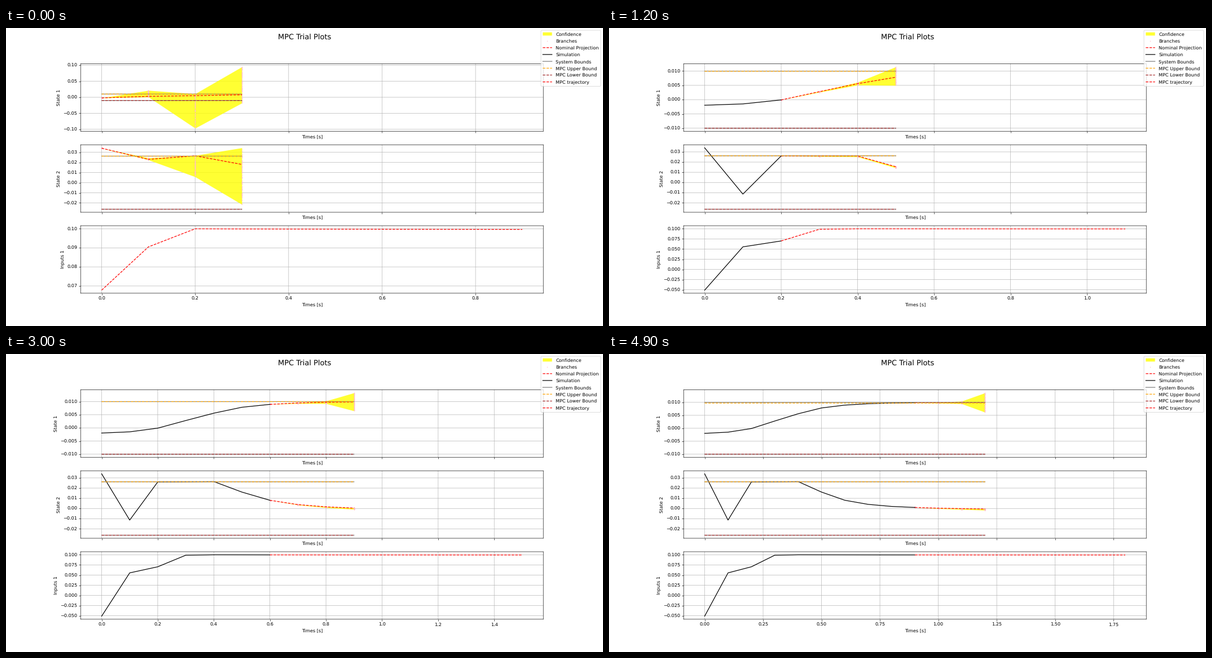
Write a matplotlib script that moves like this. It is 1058 by 529 pixels and loops after 5000 ms.

```python
import numpy as np
import matplotlib.pyplot as plt
from matplotlib.animation import FuncAnimation

plt.rcParams.update({"font.family": "DejaVu Sans", "text.hinting": "none",
                     "path.snap": False})

DT, STEPS, ITERS, HORIZON, AHEAD = 0.1, 10, 5, 10, 4
BOUNDS = (0.01, np.deg2rad(1.5))
AHEAD_IDX = np.arange(AHEAD)
SAMPLES = 80


def settle(start, goal, ratio, n):
    """Follow the start values, then decay geometrically to the goal."""
    tail = np.arange(1, n - len(start) + 1)
    return np.r_[start, goal + (start[-1] - goal) * ratio ** tail]


# Closed-loop run: both states and the input.
X = np.array([
    settle([-.00196, -.0015, -.0001, .0028, .0056], .01, .49, 13),
    settle([.034, -.0114, .026, .0262, .0264, .0161], 0, .5, 13),
])
U = settle([-.051, .0555, .0705, .099, .1], .0995, .85, 20)

# First step: the plan moves from a guess, over a cautious one, to the run.
SLOPE = 1 - (1 - AHEAD_IDX / 3) ** 1.4
FIRST_X = np.array([
    [[-.00196, .003, .005, .0076], [.034, .023, .0265, .018]],
    [-.00196 + .005 * SLOPE, .034 - .036 * SLOPE],
    X[:, :AHEAD],
])
FIRST_U = np.array([
    settle([.0678, .0905, .1], .0995, .85, HORIZON),
    np.interp(np.arange(HORIZON), [0, 1, 2, 3, 6, 7, 8, 9],
              [.0555, .03, .0258, .0315, .0304, .028, .0338, .05]),
    U[:HORIZON],
])
# Untrained model: reach of the tube as (below, above) for each state.
FIRST_TUBE = np.array([
    [[0, .002, .1015, .0255], [0, .0185, .006, .0875]],
    [[0, .0005, .0207, .0395], [0, .0015, .0004, .0164]],
])


def blend(plans, it):
    i = min(it // 2, 1)
    w = it / 2 - i
    return plans[i] * (1 - w) + plans[i + 1] * w


def tube_reach(frame):
    if frame < ITERS:
        return FIRST_TUBE
    keys = (5, 19, 25, 49)
    below = np.interp(frame, keys, (.0039, .0018, .0033, .0038))
    above = np.interp(frame, keys, (.0029, .0044, .0034, .0037))
    return np.array([
        [[0, .0002, .0005, below], [0, .0001, .0005, above]],
        [.0004 * AHEAD_IDX, .0001 * AHEAD_IDX],
    ])


def plan(frame):
    k, it = divmod(frame, ITERS)
    if k == 0:
        return blend(FIRST_X, it), blend(FIRST_U, it)
    # The input error fades within a step and from step to step.
    error = .0077 / k ** 3 * (1 - it / (ITERS - 1)) * .4 ** np.arange(HORIZON)
    states = X[:, k:k + AHEAD].copy()
    states[1] -= .0002 * AHEAD_IDX
    states[1, 1:] -= .25 * error[:AHEAD - 1]
    return states, U[k:k + HORIZON] - error


def tightening(frame):
    k, it = divmod(frame, ITERS)
    if it == 0:
        return 0
    return .0075 if k == 0 else .00003 * k


def fit_y(ax, *data):
    values = np.concatenate(data)
    lo, hi = values.min(), values.max()
    pad = .05 * (hi - lo)
    ax.set_ylim(lo - pad, hi + pad)


def state_artists(ax):
    def line(style, color, label=None):
        return ax.plot([], [], style, color=color, label=label)[0]
    return dict(
        tube=ax.fill_between([0, 1], 0, 1, color="yellow", alpha=.8, lw=0,
                             zorder=1.6, label="Confidence"),
        dots=ax.scatter([0], [0], s=.6, color="pink", zorder=1.7,
                        label="Branches"),
        nominal=line("--", "red", "Nominal Projection"),
        sim=line("-", "black", "Simulation"),
        top=line("-", "gray", "System Bounds"),
        bottom=line("-", "gray"),
        upper=line("--", "orange", "MPC Upper Bound"),
        lower=line("--", "brown", "MPC Lower Bound"),
    )


fig, axes = plt.subplots(3, 1, sharex=True, figsize=(18, 9), dpi=1058 / 18)
fig.suptitle("MPC Trial Plots", fontsize=16)
for ax, name in zip(axes, ("State 1", "State 2", "Inputs 1")):
    ax.set_xlabel("Times [s]")
    ax.set_ylabel(name)
    ax.grid()

artists = [state_artists(ax) for ax in axes[:2]]
u_sim, = axes[2].plot([], [], "-", color="black")
u_plan, = axes[2].plot([], [], "--", color="red", label="MPC trajectory")
handles, labels = axes[0].get_legend_handles_labels()
fig.legend(handles + [u_plan], labels + [u_plan.get_label()],
           loc="upper right", labelspacing=.54)


def update(frame):
    k = frame // ITERS
    rng = np.random.default_rng(frame)
    states, inputs = plan(frame)
    past = np.arange(k + 1) * DT
    ahead = (k + AHEAD_IDX) * DT
    span = [0, ahead[-1]]
    cut = tightening(frame)

    rows = zip(axes, artists, X, states, tube_reach(frame), BOUNDS,
               (cut, 0))
    for ax, art, x, nominal, (below, above), b, c in rows:
        lo, hi = nominal - below, nominal + above
        art["tube"].set_verts([np.r_[np.c_[ahead, hi],
                                     np.c_[ahead, lo][::-1]]])
        dots = lo + (hi - lo) * rng.random((SAMPLES, AHEAD))
        art["dots"].set_offsets(np.c_[np.tile(ahead, SAMPLES), dots.ravel()])
        art["nominal"].set_data(ahead, nominal)
        art["sim"].set_data(past, x[:k + 1])
        for key, y in (("top", b), ("bottom", -b),
                       ("upper", b - c), ("lower", .1 * c - b)):
            art[key].set_data(span, [y, y])
        fit_y(ax, lo, hi, x[:k + 1], [-b, b])

    done = np.r_[U[:k], inputs[0]]
    u_sim.set_data(past, done)
    u_plan.set_data((k + np.arange(HORIZON)) * DT, inputs)
    fit_y(axes[2], done, inputs)
    end = (k + HORIZON - 1) * DT
    axes[0].set_xlim(-.05 * end, 1.05 * end)
    return []


anim = FuncAnimation(fig, update, frames=STEPS * ITERS, interval=100,
                     init_func=lambda: [], repeat=True, repeat_delay=0)
plt.show()
```
